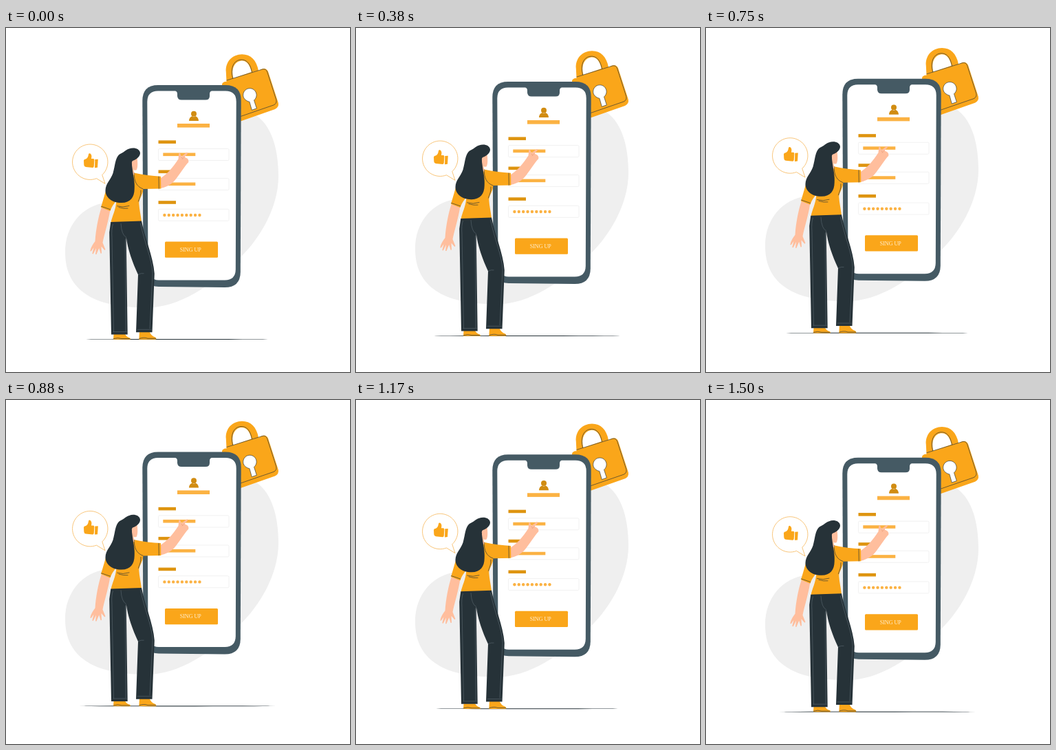
Recreate the animation shown at these times as an HTML page. Size 500 by 500 pixels, loop 1540 ms.

```html
<!DOCTYPE html>
<html lang="en">
<head>
<meta charset="utf-8">
<title>Sign up</title>
<style>
html, body { margin: 0; width: 100%; height: 100%; overflow: hidden; background: #fff; }
svg { display: block; width: 100vw; height: 100vh; }
.o { fill: #faa61a; }
.dark { fill: #263238; }
.skin { fill: #ffbe9d; }
.pale { fill: #fbb243; }
.deep { fill: #de940f; }
.line { fill: none; stroke: #263238; stroke-width: .65; stroke-linecap: round; stroke-linejoin: round; }
.seam { fill: none; stroke: #64737a; stroke-width: .5; }
.field { fill: #fff; stroke: #eee; stroke-width: .8; }
</style>
</head>
<body>
<svg viewBox="0 0 500 500">
<g id="scene">
  <path fill="#efefef" d="M365 128C388 145 396 180 396 215C396 264 366 309 341 333C300 375 250 406.500 205 406.500C147 406.500 86 393 86 326C86 286 112 258 145 254C200 247 300 130 340 120Z"/>
  <ellipse class="dark" cx="249" cy="452.500" rx="155" ry=".08"/>
  <ellipse class="dark" cx="248.500" cy="452.500" rx="135" ry=".5"/>

  <g id="lock">
    <path class="o" d="M320.500 78L319.800 64C318.500 49 329 38.500 343 38.300C356 38.300 364 47 367 62L372 59.500Q378.500 57.500 381 63.500L395.800 109Q397 115 391 118L341 135.500L330 136L314 83Q313.500 79.500 318 78Z"/>
    <path fill="#fff" d="M330.500 73C327 61 331 49.500 341 47.700C350 46.500 354.500 54 356.800 64Z"/>
    <path class="line" d="M329.500 73C326 59 330 48 340 46.200C350 45 355 52 357.500 64"/>
    <path class="line" d="M321 76L373 59.900Q378 59 379.800 64L392.800 104.500Q393.800 110 389 112L341 128.500"/>
    <path class="line" style="fill:#fff" d="M352 106.700C347.500 105 344.500 101.500 344.700 97A9.700 9.700 0 1 1 360.500 105L364.300 116.800L357.300 119.300L354 107.500Z"/>
  </g>

  <g id="phone">
    <path fill="#455a64" d="M221 83H319Q341.700 83 341.700 105.500L340.800 355Q340.500 377 318 377L222 376Q200 375 199.500 354L198.300 106Q198.300 83 221 83Z"/>
    <path fill="#fff" d="M221 91.500H246Q249 92 249 96V99Q249.500 104.500 255 104.500H290Q296 104.500 296 99V96Q296 92 299 91.500H319Q334.700 91.500 334.700 107L333.800 351Q333.500 366.500 318 366.500H222Q207 366 206.500 351L205.300 107Q205.500 91.500 221 91.500Z"/>
    <g fill="#d18c12"><circle cx="273" cy="124.800" r="4"/><path d="M266 135C266.300 130.500 269 128.300 271 128.300Q273 130 275 128.300C277 128.300 279.700 130.500 280 135Z"/></g>
    <rect class="pale" x="249" y="139" width="47" height="5.600"/>
    <g id="form"></g>
    <rect class="o" x="231" y="310.500" width="77" height="23.300" rx="1.500"/>
    <text x="268.200" y="325" fill="#fff0d5" font-family="'Liberation Serif', serif" font-size="8" text-anchor="middle">SING UP</text>
  </g>

  <g id="bubble">
    <path fill="#fff" stroke="#f6b758" stroke-width=".8" stroke-linejoin="round" d="M131.500 218.700A25.700 25.700 0 1 1 139.800 213.500L144 226.300Z"/>
    <path class="o" d="M113 192.500Q113.500 190.500 116 190.500C119 189 119.500 186 120 183.500Q120.500 181.500 122.500 182.500C125 184.500 124.500 187.500 124 190H127Q128.300 190 128.300 192L127.800 201Q127.500 203 126 203L116 202Q113.500 201.500 113.300 199Z"/>
    <path class="o" d="M129.300 191L133.800 190.800L133 202.800L129 203.200Z"/>
  </g>

  <g id="woman">
    <path class="skin" d="M138.700 261L151.300 265C149 281 143 299 140.500 312L144.500 322L143.300 323L138.500 317.500L139 327.500L137.600 327.800L135.200 320L131.500 329L130 329L131 320L126.800 328.500L125.300 328L127.500 319L123.800 324.500L122.300 324.200C123.500 318 127 313.500 129.500 310C130.500 294 134 275 138.700 261Z"/>
    <path class="skin" d="M223 219.500C234 213 243 202 250.500 190.500L251.200 182.500Q252.600 181 253.500 183L254.800 187L262.500 181Q264.800 180.500 263.800 182.800L259.500 187.500L263.300 189.500Q265.700 191 265.300 195C260 200 252 214 244 223Q236 231 223 233.500Z"/>
    <path class="line" style="stroke:#e79b77;stroke-width:.6" d="M254.800 187L256.500 190M259.500 187.500L256 190.500"/>

    <g class="o">
      <path d="M156 452.700L156.500 445H173Q175 449 180.500 450.700Q181.800 452.700 179 452.800Z"/>
      <path d="M193.300 452.700L194 441H208.500Q210.500 447.500 217 449.500Q220 452 217 452.800Z"/>
      <path d="M186 210.500C199 213.500 213 215 225 215.700L225.300 233.500L199.300 234C199.500 242 193 248 193.300 255C193.800 264 196 272 197 281.500L152.500 283C154 274 159.500 265 160.500 251Z"/>
      <path d="M147 230L138 260.700L151.500 266C154 258 159 253 164 246Z"/>
    </g>
    <path class="line" d="M156.500 451.500Q163 449.500 168 451.500L179.500 451.500M194 451.300Q201 449 206 451.200L217.500 451.200"/>
    <path class="line" d="M138.600 259.300L151.500 263.700M222 216L222.300 233.300M186.500 211C185.500 222 190 231 199 233.800M196 236C196.500 243 194 247 192.500 252M161.500 258.800Q170 261.500 179 258.500M164 260.700Q171 263 177 262.200"/>

    <path class="dark" d="M152.300 282L197 280.500C201.500 305 214 332 215.800 357L212.500 442.300H189L192 358.500C184 341 177 322 174.700 304L176.700 445.500H153L150.200 297Z"/>
    <path class="seam" d="M155.500 285Q153 292 154 305L156.500 441.700M155.500 441.500H175.800M173.600 307L174 441M167 284Q168 301 174.700 304M190.700 438.300H211.500M195.500 284C200.500 310 212.500 336 213 357L209 437M192 358.500Q196 356 200.500 356.800"/>

    <path class="skin" d="M181 190L190.300 187.500C191.500 194 192 203 189.500 206.500Q187 207.300 185.500 206L186.500 213Q183 215 180 211Z"/>
    <path class="dark" d="M179 175.500C186 172.800 194.500 175.500 195 181.500C195.200 187 189.500 191 184 193C182 197 183.500 201 184 207C185 215 187.500 224 186.700 234C186.500 246 181 253.900 168 254.100C154 254.300 144.300 246 144.500 236C144.800 226 152 221 155.500 211C159 200 158.500 186 167 182.500C171 181 173 177.500 179 175.500Z"/>
    <ellipse class="skin" cx="184.800" cy="196" rx="2" ry="2.700"/>
  </g>
</g>
</svg>
<script>
const LOOP = 1540, STEPS = 37, PEAK = 17.4, RATE = .55;
const scene = document.getElementById('scene');

const rect = (cls, x, y, w, h, rx = 0) =>
  `<rect class="${cls}" x="${x}" y="${y}" width="${w}" height="${h}" rx="${rx}"/>`;

function buildForm() {
  let out = '';
  for (const [label, box] of [[163.4, 175.5], [206.5, 218.5], [251.2, 263.3]]) {
    out += rect('deep', 221.5, label, 25.5, 4.6) + rect('field', 221.5, box, 102.5, 17, 1.5);
    if (box < 260) out += rect('pale', 228.3, box + 6, 47, 4.6);
    else for (let i = 0; i < 9; i++)
      out += `<circle class="pale" cx="${230.4 + i * 6.38}" cy="272" r="2.2"/>`;
  }
  document.getElementById('form').innerHTML = out;
}

// The whole scene rises, then sinks, at a steady pace in even steps.
function draw(ms) {
  const n = Math.floor((ms % LOOP) / LOOP * STEPS);
  const y = RATE * (Math.abs(n - PEAK) - PEAK);
  scene.setAttribute('transform', `translate(0 ${y.toFixed(3)})`);
}

buildForm();
draw(0);
const start = performance.now();
(function tick() {
  draw(performance.now() - start);
  requestAnimationFrame(tick);
})();
</script>
</body>
</html>
```
